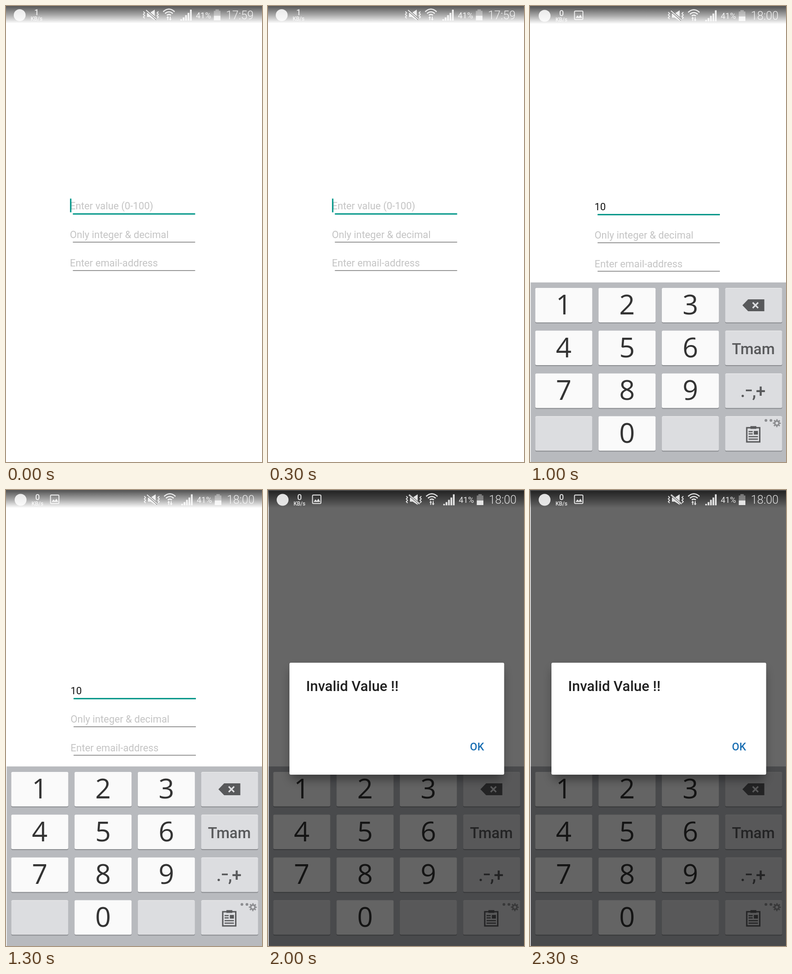
Animation, 561 px wide and 998 px high, one loop 2500 ms. Source, as an HTML page:

```html
<!DOCTYPE html>
<html lang="en">
<head>
<meta charset="utf-8">
<title>Input validation</title>
<style>
html, body { margin: 0; width: 100%; height: 100%; overflow: hidden; background: #fff; }
svg { display: block; width: 561px; height: 998px; font-family: Roboto, sans-serif; }
.hint { fill: #c4c4c4; font-size: 21.8px; }
.digit { font: 400 60px "Open Sans", sans-serif; fill: #333; text-anchor: middle; }
.cmd { font-weight: 500; fill: #58595b; }
</style>
</head>
<body>
<svg viewBox="0 0 561 998">
  <defs>
    <linearGradient id="fade" gradientUnits="userSpaceOnUse" x1="0" y1="0" x2="0" y2="38">
      <stop offset="0" stop-opacity=".66"/>
      <stop offset=".5" stop-opacity=".35"/>
      <stop offset="1" stop-opacity="0"/>
    </linearGradient>
    <filter id="shadow" x="-20%" y="-20%" width="140%" height="150%">
      <feGaussianBlur stdDeviation="11"/>
    </filter>
  </defs>
  <rect width="561" height="998" fill="#fff"/>

  <g id="form">
    <text id="value" x="140" y="445" font-size="21.8"></text>
    <text class="hint" x="140" y="507.5">Only integer &amp; decimal</text>
    <text class="hint" x="140" y="570">Enter email-address</text>
    <rect x="146.5" y="453.6" width="268" height="3" fill="#009688"/>
    <path d="M146.5 516.8h268M146.5 579.1h268" stroke="#757575" stroke-width="1.5"/>
    <rect id="caret" y="421.5" width="3" height="30" fill="#009688"/>
  </g>

  <g id="keyboard">
    <rect x="1.5" y="605" width="560" height="393" fill="#b8babe"/>
    <g id="keys"></g>
    <path d="M465.5 655L478 642H513.5V668H478Z" fill="#58595b"/>
    <path d="M488 649l12 12m0-12l-12 12" stroke="#dcdde0" stroke-width="3.2"/>
    <text class="cmd" x="489.5" y="762" font-size="33" text-anchor="middle">Tmam</text>
    <text class="cmd" x="461 487 495" y="856" font-size="38">.,+</text>
    <rect x="473" y="839.5" width="13" height="3.6" fill="#58595b"/>
    <g fill="none" stroke="#58595b">
      <rect x="475" y="923" width="28.5" height="31" stroke-width="3"/>
      <path d="M483 922.5h13" stroke-width="6"/>
      <path d="M479 931.5h9m-9 5h9m-9 6h20.500m-20.500 5.500h20.500" stroke-width="2.600"/>
      <path d="M490.500 934h9" stroke-width="8"/>
    </g>
    <g fill="#8c8d90">
      <circle cx="517" cy="907" r="3"/>
      <circle cx="528" cy="907" r="3"/>
    </g>
    <g fill="none" stroke="#8c8d90">
      <circle cx="541" cy="913" r="4.700" stroke-width="3.400"/>
      <circle cx="541" cy="913" r="7.300" stroke-width="3" stroke-dasharray="2.867" stroke-dashoffset="1.433"/>
    </g>
  </g>

  <rect id="dim" x="1.5" y="1.500" width="560" height="997" opacity=".6"/>

  <g id="status">
    <rect id="bar" width="570" height="42" fill="url(#fade)"/>
    <g fill="#fff" opacity=".85">
      <circle cx="30" cy="20" r="13"/>
      <g font-weight="500" text-anchor="middle">
        <text id="rate" x="67" y="20" font-size="18"></text>
        <text x="67" y="32" font-size="12">KB/s</text>
      </g>
      <g id="picture">
        <rect x="95.500" y="9.500" width="18.500" height="18.500" rx="2" fill="none" stroke="#fff" stroke-width="2"/>
        <path d="M98 24.500l4-5.500 3 3.500 3.500-5 4 7z"/>
      </g>
      <path d="M309 15h6l11-7v23l-11-7h-6z"/>
      <path d="M307 9l23 20" stroke="#777" stroke-width="4.500"/>
      <g fill="none" stroke="#fff" stroke-width="1.800">
        <path d="M307 9l23 20" stroke-width="2.200"/>
        <path d="M301 12l3 3-3 3 3 3-3 3 3 3M334 12l-3 3 3 3-3 3 3 3-3 3"/>
        <path d="M344.500 12.500q12.500-11.500 25 0M348.500 16.500q8.500-7.500 17 0M352.500 20.300q4.500-4 9 0" stroke-width="2.600"/>
        <path d="M354.500 24v7M360 23v6" stroke-width="2"/>
      </g>
      <path d="M351.500 26l3-4 3 4zM357 28l3 4 3-4z"/>
      <g id="bars"></g>
      <text x="416" y="26.500" font-size="18">41%</text>
      <path d="M459 7.500h7.500v3h3.500v11.500h-14.500v-11.500h3.500z" opacity=".4"/>
      <rect x="455.500" y="21.500" width="14.500" height="10"/>
      <text id="clock" x="482" y="28.500" font-size="25" font-weight="300"></text>
    </g>
  </g>

  <g id="dialog">
    <rect x="51" y="392" width="462" height="241" rx="6" opacity=".42" filter="url(#shadow)"/>
    <rect x="47" y="378" width="470.500" height="245" rx="3" fill="#fff"/>
    <text x="83.500" y="439.500" font-size="31.200" font-weight="500" fill="#212121">Invalid Value !!</text>
    <text x="442.500" y="569.500" font-size="23.400" font-weight="500" fill="#1a6fb3">OK</text>
  </g>
</svg>
<script>
const NS = 'http://www.w3.org/2000/svg';
const $ = id => document.getElementById(id);
const set = (el, attrs) => { for (const k in attrs) el.setAttribute(k, attrs[k]); };
const show = (id, on) => set($(id), { visibility: on ? 'visible' : 'hidden' });

function add(parent, tag, attrs, text = '') {
  const el = document.createElementNS(NS, tag);
  set(el, attrs);
  el.textContent = text;
  parent.appendChild(el);
}

const rows = [['1', '2', '3', ''], ['4', '5', '6', ''], ['7', '8', '9', ''], ['', '0', '', '']];
rows.forEach((row, r) => row.forEach((label, c) => {
  const x = 11.5 + c * 138.7, y = 617 + r * 93.6;
  const box = { x, width: 125, height: 75.5, rx: 3 };
  add($('keys'), 'rect', { ...box, y: y + 2, fill: '#8b8d91' });
  add($('keys'), 'rect', { ...box, y, fill: label ? '#fafafa' : '#dcdde0' });
  if (!label) add($('keys'), 'path', { d: `M${x + 2} ${y + .6}h121`, stroke: '#eeeeef' });
  if (label) add($('keys'), 'text', { class: 'digit', x: x + 62.5, y: y + 58 }, label);
}));

[3, 7, 12, 17, 24].forEach((height, i) =>
  add($('bars'), 'rect', { x: 382 + i * 5.3, y: 32 - height, width: 3.8, height }));

const STEP = 500;
const typed = ['', '1', '10', '101', '101'];

function draw(ms) {
  const step = Math.floor(ms / STEP) % typed.length;
  const open = step > 0, alert = step === 4;
  const text = typed[step];

  set($('form'), { transform: open ? 'translate(1.6 1.5)' : '' });
  set($('status'), { transform: open ? 'translate(2 1.5)' : '' });
  const edge = step === 0 || step === 1 ? 0 : -2;
  set($('bar'), { x: edge, y: edge });

  $('value').textContent = text || 'Enter value (0-100)';
  set($('value'), { fill: text ? '#111' : '#c4c4c4' });
  set($('caret'), { x: 140.3 + text.length * 12.25 });
  show('caret', step === 0 || step === 3);

  $('rate').textContent = open ? '0' : '1';
  $('clock').textContent = open ? '18:00' : '17:59';
  show('picture', open);
  show('keyboard', open);
  show('dim', alert);
  show('dialog', alert);
}

const start = performance.now();
function tick() {
  draw(performance.now() - start);
  requestAnimationFrame(tick);
}
draw(0);
requestAnimationFrame(tick);
</script>
</body>
</html>
```
